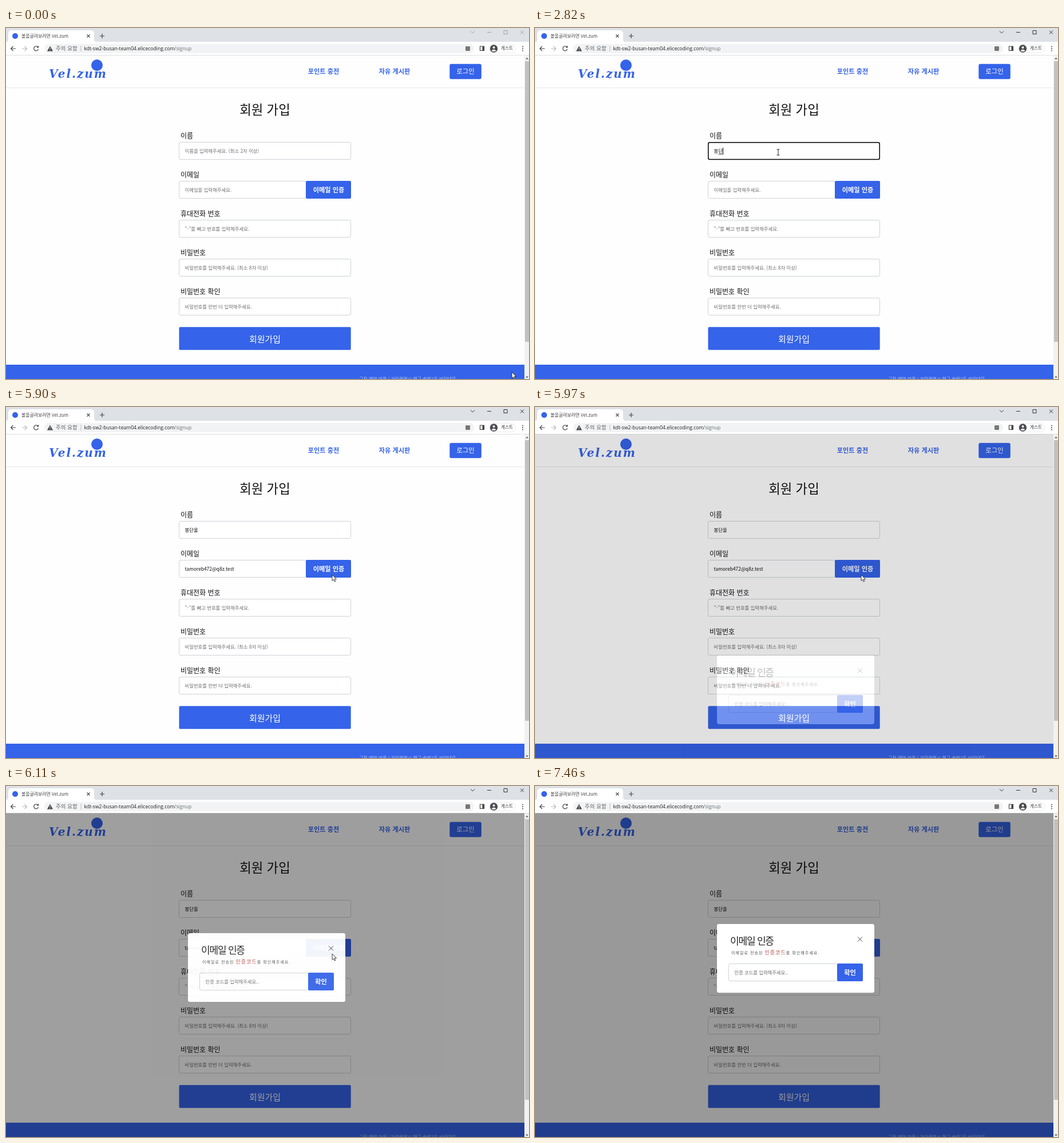
An HTML page that plays this animation: 914x613 px, repeating every 8000 ms.

```html
<!DOCTYPE html>
<html lang="ko">
<head>
<meta charset="utf-8">
<style>
html, body { margin: 0; width: 100%; height: 100%; overflow: hidden; background: #fff; }
svg { display: block; font-family: "Noto Sans CJK KR", "Noto Sans CJK", "Noto Sans", sans-serif; }
text { white-space: pre; }
.url { font-family: "Open Sans", sans-serif; }
.brand { font: italic 700 20px "DejaVu Serif", serif; letter-spacing: 2px; }
.line { fill: none; stroke: #444; stroke-width: 1.2; }
</style>
</head>
<body>
<svg id="stage" width="914" height="613" viewBox="0 0 914 613"></svg>
<script>
const BLUE = '#3563e9', HINT = '#6f6f6f', LOOP = 8000;
const stage = document.getElementById('stage');

// y is the vertical centre of the Hangul glyphs
const text = (x, y, size, str, fill = '#111', attrs = '') =>
  `<text x="${x}" y="${y + size * 0.39}" font-size="${size}" fill="${fill}" ${attrs}>${str}</text>`;
const mid = (x, y, size, str, fill, weight = 400) =>
  text(x, y, size, str, fill, `text-anchor="middle" font-weight="${weight}"`);
const box = (x, y, w, h, fill, r = 0, attrs = '') =>
  `<rect x="${x}" y="${y}" width="${w}" height="${h}" rx="${r}" fill="${fill}" ${attrs}/>`;
const line = (d, attrs = '') => `<path class="line" d="${d}" ${attrs}/>`;
const input = (x, y, w, attrs = '') =>
  box(x + .5, y + .5, w - 1, 30, '#fff', 2.5, `stroke="#ced2d8" ${attrs}`);

const fields = [
  ['이름', '이름을 입력해주세요. (최소 2자 이상)'],
  ['이메일', '이메일을 입력해주세요.'],
  ['휴대전화 번호', '"-"를 빼고 번호를 입력해주세요.'],
  ['비밀번호', '비밀번호를 입력해주세요. (최소 8자 이상)'],
  ['비밀번호 확인', '비밀번호를 한번 더 입력해주세요.']
].map(([label, hint], i) => ({ label, hint, y: Math.round(199 + 68.1 * i), w: i === 1 ? 223 : 301 }));

const browser = `
  ${box(0, 0, 914, 24, '#dee1e6')}${box(0, 24, 914, 23, '#fff')}
  <path d="M0 24q4 0 4-4V10q0-6 6-6h138q6 0 6 6v10q0 4 4 4z" fill="#fff"/>
  <circle cx="16" cy="14" r="5" fill="${BLUE}"/>
  ${text(27, 14, 7.9, '볼을굴려보려면 Vel.zum', '#454545')}
  ${line('M141.5 11.5l5 5m0-5l-5 5M164 14h8m-4-4v8')}
  <g id="controls">${line('M812 5.5l3.5 3.5 3.5-3.5M841 7.5h7M870 4.5h6v6h-6zM899 4.5l6 6m0-6l-6 6', 'style="stroke:inherit;stroke-width:1"')}</g>
  ${line('M17 36H8.5m4-4l-4 4 4 4')}
  ${line('M28 36h8.5m-4-4l4 4-4 4', 'style="stroke:#bbb"')}
  ${line('M56 33.5a4 4 0 1 0 .5 3.5M56.5 31v3h-3')}
  ${box(67, 28, 751, 16, '#f1f3f4', 8)}
  <path d="M77 31.5l5 9h-10z" fill="#444"/><path d="M77 34.5v3m0 1v1" stroke="#fff"/>
  ${text(87, 35.5, 9.5, '주의 요함', '#5f6368')}
  ${box(130.5, 31, 1, 10, '#bbb')}
  <text class="url" x="136.5" y="38.8" font-size="8.57" fill="#222">kdt-sw2-busan-team04.elicecoding.com<tspan fill="#6b6f73">/signup</tspan></text>
  ${box(803, 32, 8, 8, '#777', 1)}
  ${line('M828.5 32h7v7.5h-7z')}${box(832.5, 32, 3.5, 7.5, '#444')}
  ${box(844.5, 28.5, 46, 15, '#fff', 7.5, 'stroke="#e8eaed"')}
  <circle cx="852.5" cy="36" r="6.7" fill="#484b50"/>
  <circle cx="852.5" cy="34" r="2" fill="#fff"/><path d="M848.5 39.5q4-4 8 0-4 3-8 0z" fill="#fff"/>
  ${text(865, 35.5, 7.6, '게스트', '#333')}
  ${[32.5, 36, 39.5].map(y => `<circle cx="903" cy="${y}" r="1" fill="#444"/>`).join('')}
  ${box(0, 47, 914, 1, '#dcdee0')}`;

const page = `
  ${box(0, 48, 906, 565, '#fefefe')}
  ${box(0, 104, 906, 1, '#e8e8e8')}
  <circle cx="159" cy="65" r="10" fill="${BLUE}"/>
  <text class="brand" x="75" y="87" fill="${BLUE}">Vel.zum</text>
  ${mid(555, 76, 11.2, '포인트 충전', BLUE, 700)}${mid(679, 76, 11.2, '자유 게시판', BLUE, 700)}
  ${box(775.3, 62.7, 55.5, 26.6, BLUE, 3)}${mid(803, 76, 11.4, '로그인', '#fff', 500)}
  ${mid(452.5, 142, 22.3, '회원 가입')}
  ${fields.map((f, i) => text(305, f.y - 10.5, 12, f.label) + input(302, f.y, f.w) +
    text(312.5, f.y + 16, 8.4, f.hint, HINT, `id="hint${i}"`)).join('')}
  <rect id="focus" x="302.8" width="0" height="29.5" rx="2.5" fill="none" stroke="#000" stroke-width="1.5"/>
  ${text(312.5, 215, 8.4, '', '#111', 'id="value0"')}${text(312.5, 283, 8.4, '', '#111', 'id="value1"')}
  ${box(0, 220, 7, .8, '#222', 0, 'id="compose"')}${box(0, 0, 1, 12, '#000', 0, 'id="caret"')}
  ${box(524, 267, 79, 31, BLUE, 2)}${mid(564, 283, 11.2, '이메일 인증', '#fff', 700)}
  ${box(302.5, 522.3, 300.2, 40, BLUE, 2)}${mid(452.5, 543, 15, '회원가입', '#fff', 500)}
  ${box(0, 588, 906, 25, BLUE)}
  ${text(617, 613, 8, '구장 예약 마을 | 가람광역시 해구 솔빛2동 바람대로', '#b4c6f7')}`;

const modal = `
  <g id="modal">
    <path fill-opacity=".4" fill-rule="evenodd" d="M0-400H906V1200H0Z M322 241h267a4 4 0 0 1 4 4v112a4 4 0 0 1-4 4h-267a4 4 0 0 1-4-4v-112a4 4 0 0 1 4-4z"/>
    ${box(318, 241, 275, 120, '#fff', 4)}
    ${text(341, 270, 17, '이메일 인증', '#222', 'letter-spacing="-1.2"')}
    ${line('M564 263.5l8 8m0-8l-8 8', 'style="stroke-width:1"')}
    ${text(343, 291.5, 7, '이메일로 전송된 <tspan font-size="9" font-weight="500" fill="#b94a48">인증코드</tspan>를 확인해주세요.', '#555', 'letter-spacing="1.05"')}
    ${input(338, 310, 192)}${text(348.5, 325.5, 8.3, '인증 코드를 입력해주세요..', HINT)}
    ${box(528, 310, 45, 31, BLUE, 2)}${mid(550.5, 326, 11.2, '확인', '#fff', 700)}
  </g>`;

stage.innerHTML = `
  <clipPath id="view">${box(0, 47.6, 906, 566, '#000')}</clipPath>
  ${browser}<g clip-path="url(#view)">${page}${modal}</g>
  ${box(906, 48, 8, 565, '#f1f1f1')}${box(907, 58, 7, 490, '#c1c1c1')}
  <path d="M908 54.5l2.5-3 2.5 3zM908 608.5l2.5 3 2.5-3z" fill="#666"/>
  <g id="cursor">
    <path id="arrow" d="M0 0v10.5l2.4-2.2 1.7 3.7 1.7-.7-1.7-3.6h3.4z" fill="#fff" stroke="#111" stroke-width=".8"/>
    <path id="beam" d="M-2.5-5h5M0-5v10M-2.5 5h5" fill="none" stroke="#222"/>
  </g>`;

const el = id => document.getElementById(id);
const set = (id, attrs) => { for (const k in attrs) el(id).setAttribute(k, attrs[k]); };
const show = (id, on) => { el(id).style.display = on ? '' : 'none'; };

const typing = [[0, ''], [1020, 'q'], [1880, ''], [2080, 'ㅂ'], [2210, '보'], [2340, '봉'],
  [2610, '봉ㄷ'], [2710, '봉다'], [2820, '봉단'], [3030, '봉단ㅇ'], [3100, '봉단우'], [3170, '봉단울']];
const path = [[70, 884, 601], [700, 425, 217], [3900, 425, 217], [4180, 425, 349], [4400, 425, 288],
  [4980, 425, 288], [5260, 480, 297], [5640, 570, 292.5], [6170, 570, 292.5], [6590, 537, 351],
  [6720, 457, 332], [6990, 457, 332], [7400, 597, 322]];
const CLICK = 750, EMAIL = 4430, PASTE = 4830, BLUR = 5770, LEAVE = 7460;

function cursorAt(t) {
  const i = path.findIndex(p => p[0] > t);
  if (i < 0) return path.at(-1).slice(1);
  if (!i) return path[0].slice(1);
  const [t0, x0, y0] = path[i - 1], [t1, x1, y1] = path[i];
  const u = (t - t0) / (t1 - t0), k = u * u * (3 - 2 * u);
  return [x0 + (x1 - x0) * k, y0 + (y1 - y0) * k];
}

// cubic-bezier(.25, .1, .25, 1)
function ease(x) {
  if (x <= 0 || x >= 1) return x <= 0 ? 0 : 1;
  const curve = (s, a, b) => 3 * s * (1 - s) ** 2 * a + 3 * s * s * (1 - s) * b + s ** 3;
  let lo = 0, hi = 1;
  for (let i = 0; i < 20; i++) {
    const s = (lo + hi) / 2;
    if (curve(s, .25, .25) < x) lo = s; else hi = s;
  }
  return curve(lo, .1, 1);
}

function render(t) {
  const step = Math.floor((t - 20) / 70) * 70 + 20;
  el('controls').style.stroke = t < CLICK ? '#a0a0a0' : '#333';

  const [typedAt, name] = typing.findLast(k => k[0] <= t);
  const email = t >= PASTE ? 'tamoreb472@q8z.test' : '';
  [name, email].forEach((value, i) => {
    el('value' + i).textContent = value;
    show('hint' + i, !value);
  });

  const active = t < CLICK || t >= BLUR ? -1 : t < EMAIL ? 0 : 1;
  show('focus', active >= 0);
  show('caret', false);
  show('compose', active === 0 && t >= 2080);
  if (active >= 0) {
    const f = fields[active];
    const end = 312.5 + el('value' + active).getComputedTextLength();
    const since = active ? (email ? PASTE : EMAIL) : Math.max(CLICK, typedAt);
    set('focus', { y: f.y + 1, width: f.w - 1.6 });
    set('caret', { x: Math.round(end), y: f.y + 10 });
    set('compose', { x: end - 7.5 });
    show('caret', Math.floor((t - since) / 530) % 2 === 0);
  }

  const p = ease((step - 5914) / 280);
  set('modal', { opacity: p, transform: `translate(0 ${Math.round(274 * (1 - p))})` });
  show('modal', p > 0);

  const [x, y] = cursorAt(step);
  const overInput = p > 0
    ? x > 338 && x < 528 && y > 310 && y < 341
    : fields.some(f => x > 302 && x < 302 + f.w && y > f.y && y < f.y + 31);
  set('cursor', { transform: `translate(${Math.round(x)} ${Math.round(y)})` });
  show('cursor', t < LEAVE);
  show('arrow', !overInput);
  show('beam', overInput);
}

const start = performance.now();
function tick() {
  render((performance.now() - start) % LOOP);
  requestAnimationFrame(tick);
}
tick();
</script>
</body>
</html>
```
